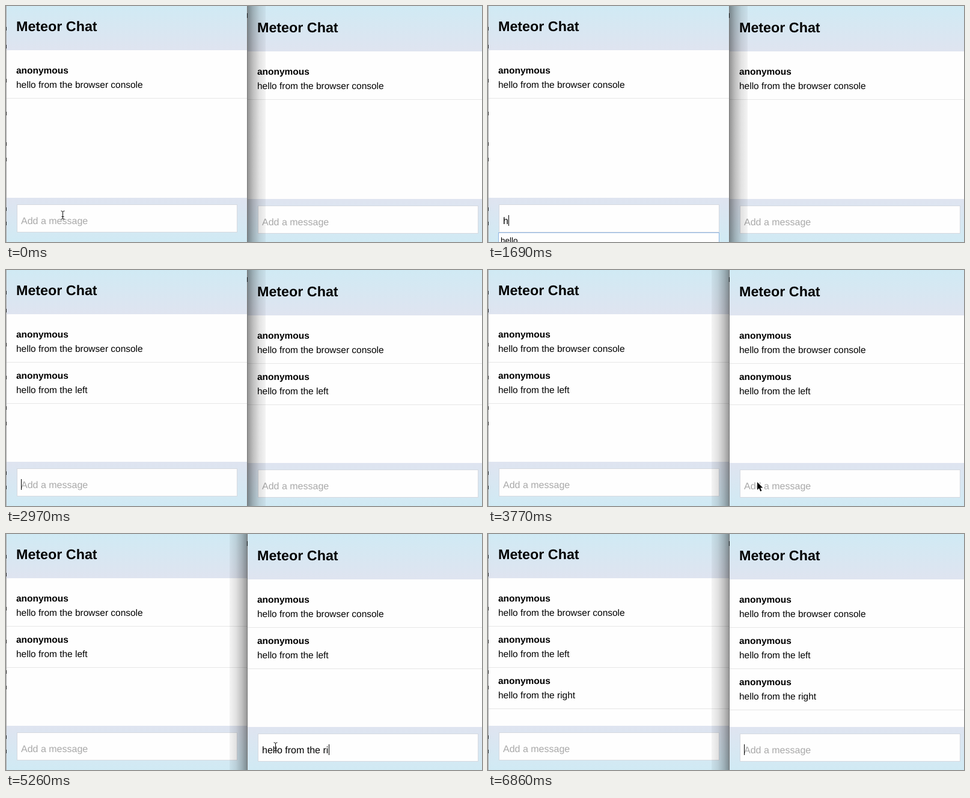
An HTML page for the animation above (6.93 s loop, 792 by 395 pixels).

```html
<!DOCTYPE html>
<html lang="en">
<head>
<meta charset="utf-8">
<title>Meteor Chat</title>
<style>
  html, body { margin: 0; width: 100%; height: 100%; overflow: hidden; background: #fefefe; }
  svg { display: block; }
  text { font-family: "Liberation Sans", Arial, sans-serif; text-rendering: geometricPrecision; white-space: pre; }
  .title { font-size: 23.3px; font-weight: bold; }
  .msg { font-size: 15.48px; }
  .name { font-size: 15.48px; font-weight: bold; }
  .field { font-size: 16px; }
  .hint { fill: #a9a9a9; }
  .option { font-size: 13.5px; }
</style>
</head>
<body>
<svg width="792" height="395" viewBox="0 0 792 395">
  <defs>
    <linearGradient id="head" x2="0" y2="1">
      <stop stop-color="#d0eaf4"/><stop offset="1" stop-color="#dfe4f0"/>
    </linearGradient>
    <linearGradient id="foot" x2="0" y2="1">
      <stop stop-color="#dfe4f0"/><stop offset="1" stop-color="#d0eaf4"/>
    </linearGradient>
    <linearGradient id="shade">
      <stop stop-opacity=".42"/><stop offset=".3" stop-opacity=".25"/>
      <stop offset=".65" stop-opacity=".11"/><stop offset="1" stop-opacity=".04"/>
    </linearGradient>
    <clipPath id="leftClip"><path d="M0 0H401V395H0z"/></clipPath>
  </defs>
  <g id="stage"></g>
</svg>
<script>
const LOOP = 6930, STEP = 70, SWAP = 3770;
const stage = document.getElementById('stage');

const every = (start, lengths) => lengths.map((n, i) => [start + i * STEP, n]);
const panes = [
  {
    text: 'hello from the left', sent: 2970,
    keys: [...every(1690, [1, 2, 3, 4, 5, 6, 7, 8, 10, 11]), ...every(2390, [12, 14, 15, 17, 18]), [2820, 19]],
    blinks: [140, 360, 580, 800, 1100, 1320, 1540, 3190]
  },
  {
    text: 'hello from the right', sent: 5850,
    keys: [...every(4420, [1, 2, 3, 4, 5, 7, 8, 9, 11, 12]), ...every(5120, [14, 15, 17]),
      [5410, 'hello from the rih'], [5560, 17], [5710, 18], [5780, 20]],
    blinks: [3990, 4210, 4420, 6070, 6370]
  }
];

function typed({ text, sent, keys }, t) {
  if (t >= sent) return '';
  const key = keys.filter(k => k[0] <= t).pop();
  if (!key) return '';
  return typeof key[1] === 'string' ? key[1] : text.slice(0, key[1]);
}

const label = (cls, x, y, s) => `<text class="${cls}" x="${x}" y="${y}">${s}</text>`;
const box = (x, y, w, h, fill, extra = '') =>
  `<rect x="${x}" y="${y}" width="${w}" height="${h}" fill="${fill}" ${extra}/>`;

function messages(t) {
  const list = ['hello from the browser console', ...panes.filter(p => t >= p.sent).map(p => p.text)];
  return list.map((s, i) => {
    const y = i * 69;
    return label('name', 17, 113 + y, 'anonymous') + label('msg', 17, 137 + y, s) +
      box(0, 154 + y, 401, 1, '#e6e6e6');
  }).join('');
}

function pane(p, t, top) {
  const s = typed(p, t);
  const caret = p.blinks.filter(b => b <= t).length % 2;
  return box(0, top, 401, 400, '#fefefe') +
    box(0, top, 401, 74 - top, 'url(#head)') +
    label('title', 17, 41.5, 'Meteor Chat') + messages(t) +
    box(0, 321, 401, 74, 'url(#foot)') +
    box(18.5, 332.5, 366, 46, '#fefefe', 'stroke="#d5d9e0"') +
    (s ? label('field typed', 25, 365, s) : label('field hint', 25, 365, 'Add a message')) +
    (s && s.length < 6
      ? box(17.5, 379.5, 367, 40, '#fefefe', 'stroke="#8fb6e4"') + label('option', 21, 397, 'hello') : '') +
    (caret ? box(25, 350, 1, 18, '#000', 'class="caret"') : '');
}

const beam = (x, y) => `<path transform="translate(${x + .5} ${y})" fill="none" stroke="#111"
  d="M-3-7Q0-7 0-5Q0-7 3-7M0-5V5M-3 7Q0 7 0 5Q0 7 3 7M-2 2.5H2"/>`;
const arrow = (x, y) => `<path transform="translate(${x} ${y})" stroke="#fff" paint-order="stroke" stroke-width="2"
  d="M0 0V13L3 10.2L5.2 15.5L7.4 14.6L5.2 9.5H9.3z"/>`;

function pointer(t) {
  if (t < 210) return beam(94, 350);
  if (t < 3490) return '';
  if (t < 3990) {
    const p = Math.min(1, (Math.floor((t - 3490) / STEP) + 1) / 4);
    const x = 94 + 354 * p * p * (3 - 2 * p), y = 350 + 5 * p;
    return (x < 385 ? beam : arrow)(Math.round(x), Math.round(y));
  }
  if (t < 6370) return beam(448, 356);
  const p = (Math.floor((t - 6370) / STEP) + 1) / 8;
  if (p >= 1) return '';
  const x = Math.round(448 + 370 * p), y = Math.round(356 + 42 * p * p);
  return (y > 380 ? arrow : beam)(x, y);
}

// Slivers of the desktop visible beside the windows
function edges() {
  const bits = [38, 68, 125, 180, 231, 257, 340, 364].map(y => `M0 ${y - 3}h1v6h-1z`).join('');
  return box(0, 0, 1, 395, '#aaa') + `<path d="${bits}" fill="#222"/>` +
    box(401, 0, 1, 395, '#777') + box(401, 12, 1, 8, '#111');
}

function scene(t) {
  const shade = box(0, 0, 30, 395, 'url(#shade)',
    `transform="${t < SWAP ? 'translate(402 0)' : 'translate(402 0) scale(-1 1)'}"`);
  return `<g transform="translate(401 2)">${pane(panes[1], t, -2)}</g>
    <g clip-path="url(#leftClip)">${pane(panes[0], t, 0)}</g>` + shade + edges() + pointer(t);
}

let last = '';
function draw(now) {
  const next = scene(now % LOOP);
  if (next !== last) {
    stage.innerHTML = last = next;
    for (const caret of stage.querySelectorAll('.caret')) {
      const text = caret.parentNode.querySelector('.typed');
      if (text) caret.setAttribute('x', Math.ceil(25 + text.getComputedTextLength()));
    }
  }
}

const start = performance.now();
function tick() {
  draw(performance.now() - start);
  requestAnimationFrame(tick);
}
tick();
</script>
</body>
</html>
```
